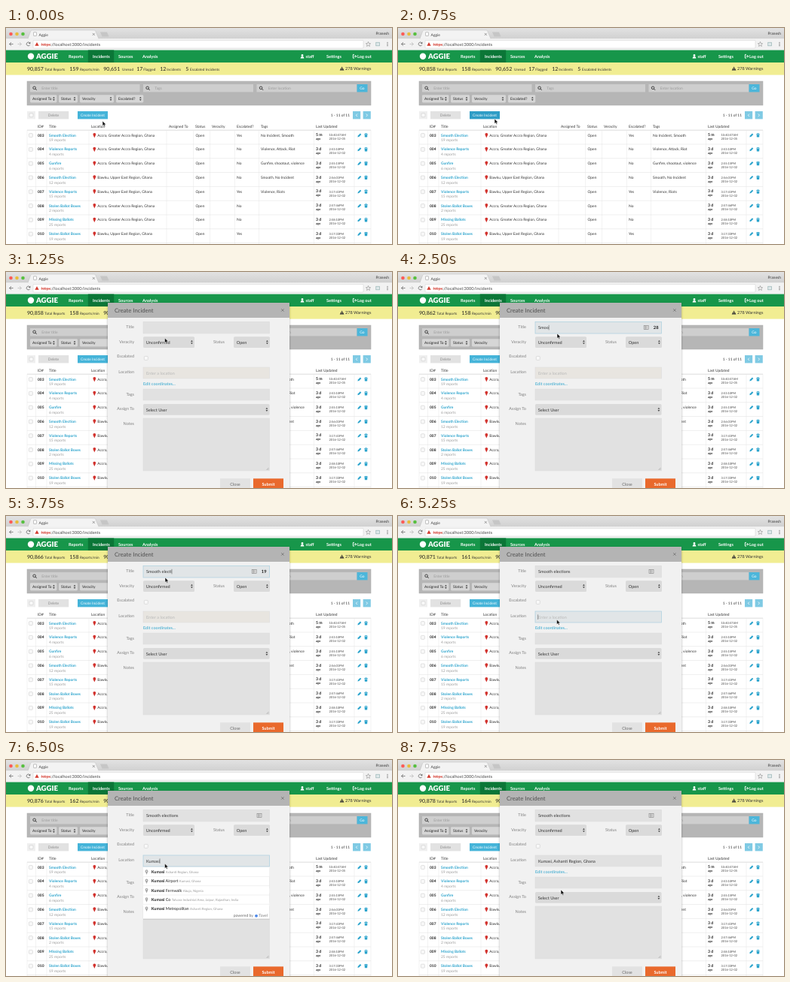
Animation, 512 px wide and 288 px high, one loop 8 s. Source, as an HTML page:

```html
<!DOCTYPE html>
<html lang="en">
<head>
<meta charset="utf-8">
<title>Create Incident</title>
<style>
  html, body { margin: 0; width: 100%; height: 100%; overflow: hidden; background: #fff; }
  svg { display: block; width: 100vw; height: 100vh; }
  text { font-family: Lato, "Open Sans", sans-serif; white-space: pre; text-rendering: geometricPrecision; }
</style>
</head>
<body>
<svg id="stage" viewBox="0 0 512 288">
  <defs>
    <linearGradient id="strip" x2="0" y2="1">
      <stop offset="0" stop-color="#e2e2e2"/><stop offset="1" stop-color="#d0d0d0"/>
    </linearGradient>
    <filter id="shade" x="-10%" y="-10%" width="120%" height="120%">
      <feDropShadow dx="0" dy="1.2" stdDeviation="1.8" flood-opacity=".3"/>
    </filter>
    <filter id="soft" x="-5%" y="-5%" width="110%" height="110%">
      <feDropShadow dx="0" dy=".6" stdDeviation=".6" flood-opacity=".25"/>
    </filter>
  </defs>
  <g id="page"></g>
  <g id="modal"></g>
  <path id="mouse" d="M0 0V6.6L1.6 5.2L2.7 7.6L3.8 7.1L2.8 4.8H4.8Z" fill="#111" stroke="#fff" stroke-width=".5"/>
</svg>
<script>
const NS = 'http://www.w3.org/2000/svg';
const $ = id => document.getElementById(id);
const page = $('page'), modal = $('modal'), mouse = $('mouse');
let layer = page;

function add(tag, attrs) {
  const e = document.createElementNS(NS, tag);
  for (const k in attrs) e.setAttribute(k, attrs[k]);
  layer.appendChild(e);
  return e;
}
function group(id, fn) {
  const outer = layer;
  const g = layer = add('g', { id });
  fn();
  layer = outer;
  return g;
}
const box = (x, y, x2, y2, fill, more) =>
  add('rect', { x, y, width: x2 - x, height: y2 - y, fill, ...more });
const line = (d, stroke, w = .5, more) =>
  add('path', { d, stroke, 'stroke-width': w, fill: 'none', ...more });
const shape = (d, fill) => add('path', { d, fill });
const dot = (cx, cy, r, fill) => add('circle', { cx, cy, r, fill });
function text(x, y, str, size = 4.9, fill = '#333', more) {
  const e = add('text', { x, y, 'font-size': size, fill, ...more });
  e.textContent = str;
  return e;
}
const bold = { 'font-weight': 700 };
const mid = { 'text-anchor': 'middle' };
const end = { 'text-anchor': 'end' };
const sans = { 'font-family': '"Open Sans", sans-serif' };

const check = (x, y) => box(x, y, x + 5, y + 5, '#f8f8f8', { rx: 1, stroke: '#c4c4c4', 'stroke-width': .5 });
const arrows = (x, y, c = '#444') =>
  shape(`M${x - 1.4} ${y - .6}L${x} ${y - 2.6}L${x + 1.4} ${y - .6}ZM${x - 1.4} ${y + .6}L${x} ${y + 2.6}L${x + 1.4} ${y + .6}Z`, c);
function lens(x, y) {
  add('circle', { cx: x, cy: y, r: 1.8, fill: 'none', stroke: '#333', 'stroke-width': .9 });
  line(`M${x + 1.3} ${y + 1.3}l1.8 1.8`, '#333', 1);
}
const pin = (x, y, c) => {
  shape(`M${x} ${y + 4}L${x - 1.5} ${y + .6}H${x + 1.5}Z`, c);
  dot(x, y - .6, 1.9, c);
};

function browser() {
  box(0, 0, 512, 14.5, 'url(#strip)');
  ['#fc5b57', '#e8bd3a', '#57c040'].forEach((c, i) => dot(6.5 + i * 8, 8, 2.3, c));
  shape('M29 14.5L33 3.6Q33.5 3 34.5 3H117Q118 3 118.5 3.6L123 14.5Z', '#f3f3f3');
  line('M29 14.3L33 3.6Q33.5 3 34.5 3H117Q118 3 118.5 3.6L123 14.3', '#b5b5b5', .4);
  box(36.8, 5.8, 40.2, 10.6, '#fff', { stroke: '#888', 'stroke-width': .5 });
  text(43.5, 10.6, 'Aggie', 5, '#444', sans);
  line('M114.8 6.9l3 3m0-3l-3 3', '#666', .6);
  shape('M125 5.5h9l2.6 6h-9Z', '#c6c6c6');
  text(508, 9.4, 'Pranesh', 5, '#333', { ...sans, ...end });

  box(0, 14.4, 512, 29.6, '#f2f2f2');
  line('M9.5 21.4H4.6m2.3-2.3l-2.3 2.3l2.3 2.3', '#666', .8);
  line('M15.5 21.4h4.9m-2.3-2.3l2.3 2.3l-2.3 2.3', '#bbb', .8);
  line('M31.6 20a2.4 2.4 0 1 0 .2 2.4', '#666', .8);
  shape('M32.4 18.4v2.6h-2.6Z', '#666');
  box(36, 16.4, 474, 27, '#fff', { rx: 1, stroke: '#ccc', 'stroke-width': .5 });
  shape('M41 19l2.7 4.8h-5.4Z', '#d33b2f');
  const url = text(46.5, 23.8, '', 5.6, '#444', sans);
  url.innerHTML = '<tspan fill="#d33b2f" text-decoration="line-through">https</tspan>://localhost:3000/incidents';
  add('path', { d: 'M480.5 18.4l.9 2.1 2.2.2-1.7 1.5.5 2.2-1.9-1.2-1.9 1.2.5-2.2-1.7-1.5 2.2-.2Z', fill: 'none', stroke: '#777', 'stroke-width': .5 });
  box(490.8, 19.2, 495.4, 23.8, '#dfe8ea', { stroke: '#8aa', 'stroke-width': .6 });
  [19.3, 21.4, 23.5].forEach(y => dot(506, y, .65, '#666'));
}

function header() {
  const w = '#fff';
  box(0, 29.5, 512, 46, '#17964a');
  box(108.8, 29.5, 143.2, 46, '#0b7637');
  dot(33, 37.8, 4.2, w);
  text(40, 41.2, 'AGGIE', 9.6, w, { 'font-weight': 900 });
  [[83, 'Reports'], [115, 'Incidents'], [149, 'Sources'], [181, 'Analysis'], [397.5, 'staff'], [425, 'Settings'], [466, 'Log out']]
    .forEach(([x, s]) => text(x, 39.8, s, 5.6, w, bold));
  dot(393, 36.5, 1.4, w);
  shape('M390.6 40.4q0-2.3 2.4-2.3t2.4 2.3Z', w);
  line('M462 35.4h-1.7v4.7h1.7M461.6 37.8h3m-1.3-1.6l1.6 1.6l-1.6 1.6', w, .9);

  box(0, 46, 512, 62.6, '#f1ed92');
  [[51.3, 'Total Reports'], [98, 'Reports/min'], [154, 'Unread'], [182.3, 'Flagged'], [213.3, 'Incidents'], [244, 'Escalated Incidents']]
    .forEach(([x, s]) => text(x, 56.6, s, 4.7));
  [[28, 'total'], [84.3, 'rate'], [129.3, 'unread'], [173.3, '', '17'], [204.3, '', '12'], [238.3, '', '5']]
    .forEach(([x, id, s = '']) => text(x, 56.6, s, 7, '#222', id ? { id } : {}));
  shape('M445.6 51.4l2.9 5h-5.8Z', '#333');
  line('M445.6 53v1.6m0 .5v.6', '#f1ed92', .7);
  text(450, 56.2, '278 Warnings', 5.6);
}

function filters() {
  box(28, 71, 484, 103, '#b6b6b6', { stroke: '#a8a8a8', 'stroke-width': .5 });
  [[32, 177.5, 'Enter title'], [182, 328, 'Tags'], [332.5, 465.5, 'Enter location']].forEach(([x, x2, s]) => {
    box(x, 75, x2, 85.4, '#cecece');
    lens(x + 5.6, 79.8);
    text(x + 15.3, 82, s, 4.9, '#9a9a9a');
  });
  box(465.5, 75, 479.5, 85.4, '#4cb6da');
  text(472.5, 82, 'Go', 4.9, '#fff', mid);
  [[32, 67.4, 'Assigned To'], [70, 95, 'Status'], [98, 143, 'Veracity'], [146, 182.3, 'Escalated?']].forEach(([x, x2, s]) => {
    box(x, 89.2, x2, 99.4, '#d6d6d6', { rx: 1.4 });
    text(x + 3, 96, s, 4.9, '#222');
    arrows(x2 - 4, 94.3);
  });
}

function tools() {
  box(28, 111, 39, 121.4, '#efefef');
  check(31, 113.7);
  box(43, 111, 83.2, 121.4, '#e2e2e2');
  text(63, 118, 'Delete', 4.9, '#888', mid);
  box(95, 111, 135, 121.4, '', { id: 'create' });
  text(115, 118, 'Create Incident', 4.8, '#fff', mid);
  text(456, 118, '1 - 11 of 11', 4.9, '#333', end);
  [[460, 1], [473.6, -1]].forEach(([x, d]) => {
    box(x, 111, x + 10.2, 121.4, '#7fcae4');
    line(`M${x + 5.1 + d * .9} 114.6l${-d * 1.7} 1.7l${d * 1.7} 1.7`, '#fff', .8);
  });
}

const A = 'Accra, Greater Accra Region, Ghana', B = 'Bawku, Upper East Region, Ghana';
const rows = [
  ['Smooth Election', 19, A, 'Yes', 'No Incident, Smooth', '10:40:57AM'],
  ['Violence Reports', 4, A, 'No', 'Violence, Attack, Riot', '2:53:10PM'],
  ['Gunfire', 6, A, 'No', 'Gunfire, shootout, violence', '2:55:15PM'],
  ['Smooth Election', 12, B, 'No', 'Smooth, No Incident', '2:56:01PM'],
  ['Violence Reports', 15, B, 'Yes', 'Violence, Riots', '3:17:41PM'],
  ['Stolen Ballot Boxes', 2, A, 'No', '', '2:57:46PM'],
  ['Missing Ballots', 25, A, 'No', '', '2:58:10PM'],
  ['Stolen Ballot Boxes', 19, B, 'Yes', '', '3:17:33PM']
];

function table() {
  const blue = '#2ba3cc';
  [[42, 'ID#'], [57, 'Title'], [113, 'Location'], [216, 'Assigned To'], [251, 'Status'], [273, 'Veracity'], [306, 'Escalated?'], [338, 'Tags'], [411, 'Last Updated']]
    .forEach(([x, s]) => text(x, 132.8, s, 4.9));
  line('M28 136.2H484', '#ccc', .7);
  line([28, 39.5, 54, 110, 213, 248.5, 270.5, 303.5, 335.5, 408.5, 462, 484].map(x => `M${x} 136V288`).join(''), '#e6e6e6');
  rows.forEach(([title, n, place, esc, tags, time], i) => {
    const y = 144.6 + i * 18.8, first = i === 0;
    line(`M28 ${y + 10.4}H484`, '#ddd');
    check(30.4, y - 4);
    text(42, y, String(i + 3).padStart(3, '0'), 4.9, '#222', bold);
    text(57, y, title, 4.9, blue, bold);
    text(57, y + 6.6, n + ' reports', 4.9, '#999');
    pin(117.3, y - 2.2, '#d2322d');
    text(121.3, y, place);
    text(251.5, y, 'Open');
    text(306, y, esc);
    text(338, y, tags);
    text(411, y - .4, first ? '5 m' : '3 d', 5.2, '#222', bold);
    text(411, y + 4.6, 'ago', 4, '#333', bold);
    text(428.5, y - .3, time, 4, '#444');
    text(428.5, y + 4.8, first ? '2016-12-05' : '2016-12-02', 4, '#444');
    shape(`M466.4 ${y + .8}l.5-1.9 3-3 1.4 1.4-3 3Z`, blue);
    shape(`M475.2 ${y - 3.6}h1.3v-.7h2v.7h1.3v.8h-4.6ZM475.6 ${y - 2.4}h3.8l-.3 3.4h-3.2Z`, blue);
  });
}

const ink = '#333', fieldBg = '#e1e1e1', fieldEdge = '#d9d9d9', selectBg = '#dadada';
const field = (id, y, y2, x2 = 349.5) =>
  box(182, y, x2, y2, fieldBg, { id, stroke: fieldEdge, 'stroke-width': .5 });
function select(x, x2, y, s) {
  box(x, y, x2, y + 14.8, selectBg, { rx: 1.5 });
  text(x + 3.8, y + 9.6, s, 5.6, ink);
  arrows(x2 - 3.6, y + 7.4);
}

function form() {
  box(135, 41, 376, 294, '#f1f1f1', { filter: 'url(#shade)' });
  box(135, 41, 376, 61, '#b4b4b4');
  text(144, 53.8, 'Create Incident', 7.7, '#505050');
  line('M365.2 49.2l3.4 3.4m0-3.4l-3.4 3.4', '#707070', .8);
  [[75, 'Title'], [95, 'Veracity'], [114, 'Escalated'], [135.2, 'Location'], [165, 'Tags'], [184.2, 'Assign To'], [204, 'Notes']]
    .forEach(([y, s]) => text(170, y, s, 5.5, '#808080', end));
  text(290, 95, 'Status', 5.5, '#808080', end);
  field('titleBox', 66.3, 82);
  select(182, 250, 86.3, 'Unconfirmed');
  select(302, 350, 86.3, 'Open');
  check(183.3, 112.4);
  field('placeBox', 127, 142);
  text(182, 150.6, 'Edit coordinates...', 5.5, '#2ba3cc');
  field('tagBox', 156, 171);
  select(182, 349.5, 176, 'Select User');
  field('notes', 195, 265);
  line('M345.5 264l3-3m-1.2 3l1.2-1.2', '#777', .4);
  box(284, 275.4, 324, 290, '#e2e2e2');
  text(304, 284.8, 'Close', 5.5, '#666', mid);
  box(328, 275.4, 368, 290, '#e9692c');
  text(348, 284.8, 'Submit', 5.5, '#fff', { ...mid, ...bold });

  text(186, 76, '', 5.6, ink, { id: 'titleText' });
  text(186, 136.8, 'Enter a location', 5.5, '#b8b8b8', { id: 'hint' });
  text(186, 136.8, '', 5.6, ink, { id: 'placeText' });
  group('card', () => {
    box(333, 71.4, 339, 76.4, '#e4e4e4', { stroke: '#808080', 'stroke-width': .6 });
    line('M334 73h4M334 74.8h4M335.2 71.4v5', '#808080', .5);
  });
  text(345.6, 76, '', 5.8, '#222', { id: 'left', ...bold, ...end });
  line('M0 0V6.6', '#444', .5, { id: 'caret' });
  group('menu', suggestions);
}

function suggestions() {
  box(182, 143, 349.5, 211.6, '#fff', { filter: 'url(#soft)' });
  [['', 'Ashanti Region, Ghana'], [' Airport', 'Kumasi, Ghana'], [' Fernwalk', 'Abuja, Nigeria'],
   [' Co', 'Tolvara Industrial Area, Jaipur, Rajasthan, India'], [' Metropolitan', 'Ashanti Region, Ghana']].forEach(([tail, where], i) => {
    const y = 151 + i * 12.3;
    if (i) line(`M182 ${y - 7.9}H349.5`, '#e3e3e3');
    pin(186.5, y - 2.2, '#a5a5a5');
    dot(186.5, y - 2.8, .7, '#fff');
    text(192.8, y, '', 5.4, '#222').innerHTML =
      `<tspan font-weight="700">Kumasi</tspan>${tail} <tspan font-size="4.4" fill="#999">${where}</tspan>`;
  });
  text(328, 209.4, 'powered by', 5.1, '#666', end);
  dot(332, 207.8, 1.9, '#4a86e8');
  text(335.3, 209.4, 'Tovel', 5.1, '#777');
}

browser(); header(); filters(); tools(); table();
layer = modal;
form();

// last entry whose time has passed
const at = (list, t) => list.filter(e => e[0] <= t).pop();
const counts = [
  [0, 857, 159], [750, 858, 158], [1750, 860, 158], [2500, 862, 158], [3000, 864, 158], [3500, 866, 158],
  [4000, 868, 159], [4500, 870, 160], [5000, 871, 161], [5500, 873, 161], [6000, 875, 162], [6500, 876, 162],
  [7000, 877, 163], [7500, 878, 164]
];
const path = [
  [0, 128, 124], [500, 128, 121], [1000, 128, 121], [1250, 210.5, 88], [1500, 211, 80], [1750, 211, 82],
  [4000, 211, 82], [4750, 211.5, 143], [5000, 210.5, 138], [6500, 210.5, 138], [6750, 213, 147],
  [7250, 216, 150], [7500, 216, 155.5], [7750, 216, 173]
];
const clamp = (v, hi = 1) => Math.max(0, Math.min(hi, v));
function pos(t) {
  const a = at(path, t), b = path[path.indexOf(a) + 1] || a;
  const k = a === b ? 0 : (t - a[0]) / (b[0] - a[0]);
  return [a[1] + (b[1] - a[1]) * k, a[2] + (b[2] - a[2]) * k];
}
const show = (id, on) => $(id).setAttribute('visibility', on ? 'visible' : 'hidden');
function focus(id, on, rest) {
  const b = $(id);
  b.setAttribute('stroke', on ? '#a9cfdf' : fieldEdge);
  b.setAttribute('stroke-width', on ? .7 : .5);
  b.setAttribute('fill', on ? '#e1e5e7' : rest);
}

const LOOP = 8000, STEP = 250;
const TITLE = 'Smooth elections', CITY = 'Kumasi', CHOICE = 'Kumasi, Ashanti Region, Ghana';

function draw(t) {
  const [, total, rate] = at(counts, t);
  $('total').textContent = '90,' + total;
  $('rate').textContent = rate;
  $('unread').textContent = '90,' + (total - 206);
  const hover = t >= 500 && t < 1250;
  $('create').setAttribute('fill', hover ? '#2f9dc6' : '#45b4d9');

  const slide = clamp((t - 925) / 275);
  modal.setAttribute('opacity', clamp((t - 925) / 190));
  modal.setAttribute('transform', `translate(0 ${-63 * (1 - slide)})`);
  modal.setAttribute('display', t > 925 ? 'inline' : 'none');

  const inTitle = t >= 1750 && t < 5250, inPlace = t >= 5250 && t < 7000;
  const n = clamp(Math.floor((t - 1750) * .0065), TITLE.length);
  const m = clamp(Math.floor((t - 5250) / 170), CITY.length);
  const place = t >= 7000 ? CHOICE : CITY.slice(0, m);
  focus('titleBox', inTitle, fieldBg);
  focus('placeBox', inPlace, place ? fieldBg : '#e8e5e0');
  $('titleText').textContent = TITLE.slice(0, n);
  $('placeText').textContent = place;
  $('left').textContent = 32 - n;
  $('card').setAttribute('transform', `translate(${inTitle ? -6.8 : 0} 0)`);
  show('card', t >= 1750);
  show('left', inTitle);
  show('hint', !place);
  show('menu', inPlace && m > 1);
  show('caret', inTitle || inPlace);
  const typed = $(inTitle ? 'titleText' : 'placeText');
  const x = 186.2 + (typed.textContent ? typed.getComputedTextLength() : -.6);
  $('caret').setAttribute('transform', `translate(${x} ${inTitle ? 70.8 : 131.4})`);

  mouse.setAttribute('transform', `translate(${pos(t).join(' ')})`);
}

const start = performance.now();
function tick() {
  const t = (performance.now() - start) % LOOP;
  draw(Math.floor(t / STEP) * STEP);
  requestAnimationFrame(tick);
}
tick();
</script>
</body>
</html>
```
